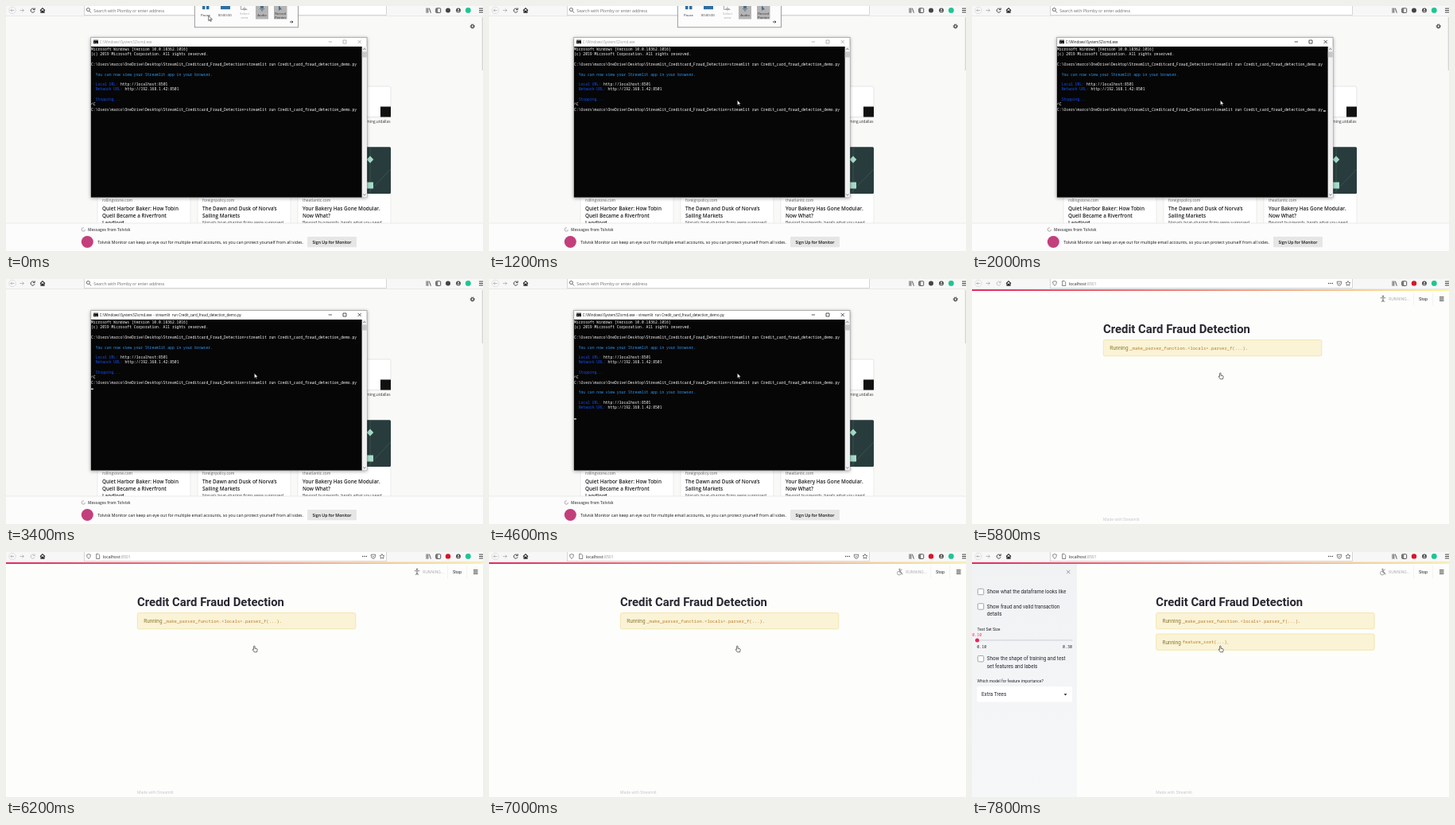
Write an HTML page that moves like this. It is 600 px wide and 308 px high and loops after 8000 ms.

```html
<!DOCTYPE html>
<html lang="en">
<head>
<meta charset="utf-8">
<title>Fraud detection demo</title>
<style>
html, body { margin: 0; width: 100%; height: 100%; overflow: hidden; background: #f9f9f8; }
svg { display: block; width: 100%; height: 100%; }
text { white-space: pre; }
.ui { font-family: "Open Sans", "Noto Sans", sans-serif; }
.app { font-family: Roboto, Inter, sans-serif; }
.mono { font-family: "Noto Sans Mono", "DejaVu Sans Mono", monospace; }
#consoleWin .mono { font-weight: 500; }
.frame { filter: drop-shadow(0 1px 2px rgba(0, 0, 0, .35)); }
</style>
</head>
<body>
<svg id="stage" viewBox="0 0 600 308" preserveAspectRatio="none"></svg>
<script>
const LOOP = 8000, STEP = 200;
const INK = '#262730';

// Drawing helpers; y of a text is its vertical middle.
const esc = s => s.replace(/&/g, '&amp;').replace(/</g, '&lt;');
const text = (x, y, size, s, fill = '#333', cls = 'ui', more = '') =>
  `<text class="${cls}" x="${x}" y="${y + size * 0.35}" font-size="${size}" fill="${fill}" ${more}>${esc(s)}</text>`;
const rect = (x, y, w, h, fill, more = '') =>
  `<rect x="${x}" y="${y}" width="${w}" height="${h}" fill="${fill}" ${more}/>`;
const line = (d, stroke, width = 0.8, more = '') =>
  `<path d="${d}" fill="none" stroke="${stroke}" stroke-width="${width}" ${more}/>`;
const shape = (d, fill, more = '') => `<path d="${d}" fill="${fill}" ${more}/>`;
const disc = (x, y, r, fill, more = '') => `<circle cx="${x}" cy="${y}" r="${r}" fill="${fill}" ${more}/>`;
const group = (id, ...parts) => `<g id="${id}">${parts.join('')}</g>`;
const BOLD = 'font-weight="700"', SEMI = 'font-weight="600"', MID = 'text-anchor="middle"';

// Browser toolbar
const lens = line('M105 6.3l2 2.2', '#444') + disc(103.4, 4.5, 2, 'none', 'stroke="#444" stroke-width=".8"');
const toolbar = group('toolbar',
  rect(0, 0, 600, 12.5, '#f7f7f7'), rect(0, 12, 600, 0.6, '#dededc'),
  rect(98.5, -2, 380, 13.3, '#fff', 'stroke="#c6c6c6" stroke-width=".7"'),
  disc(8, 5.5, 4.2, '#fafafa', 'stroke="#ccc" stroke-width=".6"'),
  line('M10.4 5.5h-4.6m2-2l-2 2 2 2M17.5 5.5h5m-2-2l2 2-2 2', '#aaa'),
  line('M43 5.6l3-2.9 3 2.9M44 5v3.2h1.4v-2h1.2v2H48V5', '#222', 1.1),
  line('M529 2.5v6.2m1.8-6.2v6.2m1.6-6l2 6', '#444', 0.9),
  rect(540.7, 2.8, 6, 5.6, 'none', 'stroke="#444" stroke-width=".9" rx=".8"'), rect(541, 3, 2.2, 5, '#777'),
  disc(569, 5.4, 2.9, '#444'), disc(569, 4.6, 1, '#eee'), rect(567.4, 6.2, 3.2, 1, '#eee', 'rx=".5"'),
  disc(581.3, 5.4, 3.4, '#1fc593'),
  line('M595 3.1h5m-5 2.4h5m-5 2.4h5', '#333', 0.9));
const reload = line('M35.6 4.1A2.5 2.5 0 1 0 36 6.3M36.2 2.4v2.2h-2.2', 'currentColor', 0.9);

const searchBar = group('searchBar', lens,
  text(110.3, 5.7, 5.2, 'Search with Plomby or enter address', '#6c6c6c'),
  disc(556, 5.4, 3, '#444'));
const address = (id, x, icons) => group(id, icons,
  `<text class="ui" x="${x}" y="7.5" font-size="5.2" fill="#222">localhost<tspan fill="#999">:8501</tspan></text>`);
const typedBar = address('typedBar', 110.3, lens);
const siteBar = address('siteBar', 121.8,
  line('M104 2.6l2.3.8c0 2.6-.6 4-2.3 5-1.7-1-2.3-2.4-2.3-5z', '#555', 0.7) +
  line('M113.6 2.5h2.6l1.5 1.5v4.5h-4.1z', '#555', 0.7) +
  [448.6, 451, 453.4].map(x => disc(x, 5.5, 0.75, '#444')).join('') +
  line('M459.3 3.2h5.4v2q-.3 2.7-2.7 3.2-2.4-.5-2.7-3.2zM460.6 5l1.4 1.3 1.4-1.3', '#555', 0.75) +
  line('M473 2.4l.9 2 2.1.2-1.6 1.5.5 2.2-1.9-1.1-1.9 1.1.5-2.2-1.6-1.5 2.1-.2z', '#555', 0.7) +
  disc(556, 5.4, 3.2, '#d5162c'));

// New-tab page behind the console
const cards = [
  [115, 'rollingstone.com', ['Quiet Harbor Baker: How Tobin', 'Quell Became a Riverfront', 'Landlord'], ''],
  [241, 'foreignpolicy.com', ['The Dawn and Dusk of Norva’s', 'Sailing Markets'], 'Norva’s boat-sharing firms were supposed'],
  [367, 'theatlantic.com', ['Your Bakery Has Gone Modular.', 'Now What?'], 'Beyond buzzwords, here’s what you need']
].map(([x, site, title, blurb]) =>
  rect(x, 178, 117, 110, '#fff', 'rx="2" stroke="#e4e4e4" stroke-width=".7"') +
  text(x + 6, 244.7, 4.9, site, '#666') +
  title.map((s, i) => text(x + 6, 254.3 + i * 9.3, 6.4, s, '#1c1c1e', 'ui', SEMI)).join('') +
  text(x + 6, 271.7, 5.2, blurb, '#333')).join('');
const newTab = group('newTab',
  rect(0, 12.6, 600, 296, '#f9f9f8'), rect(598.7, 14, 1.3, 67, '#d5d5d5'),
  disc(586.7, 25.5, 1.7, 'none', 'stroke="#333" stroke-width="1.1"'),
  disc(586.7, 25.5, 2.6, 'none', 'stroke="#333" stroke-width="1" stroke-dasharray="1 1.04"'),
  rect(430, 101, 54, 38.5, '#fff', 'rx="2" stroke="#dcdcdc" stroke-width=".7"'),
  rect(471, 126.5, 13, 13, '#111'),
  text(483.5, 145.5, 4.8, 'elearning.utdallas', '#333', 'ui', 'text-anchor="end"'),
  cards,
  rect(367, 177.2, 117, 58.8, '#293c3d', 'rx="1.5"'),
  line('M458 178v58M484 205l-30 31', '#3f5856', 0.8),
  shape('M458 188.5l4.3 4.5-4.3 4.5-4.3-4.5z', '#a5dcc9'),
  rect(454, 221.5, 8, 8, '#a5dcc9'),
  rect(0, 273, 600, 35, '#fcfcfc'), rect(0, 272.7, 600, 0.6, '#dedede'),
  disc(97.3, 281, 2.2, 'none', 'stroke="#999" stroke-width=".8" stroke-dasharray="10 3"'),
  text(103, 281, 4.8, 'Messages from Tolvisk', '#6a6a6e', 'ui', BOLD),
  disc(102.3, 296.5, 7.5, '#c23f7c'),
  text(115.3, 296.7, 5.24, 'Tolvisk Monitor can keep an eye out for multiple email accounts, so you can protect yourself from all sides.', '#111'),
  rect(379, 290, 62, 13.3, '#e6e6e7', 'rx="1"'),
  text(410, 296.7, 5.2, 'Sign Up for Monitor', '#111', 'ui', SEMI + MID));

// Console window
const CHAR = 2.839, ROW = 6.28;
const con = (row, col, s, fill = '#fafafa') =>
  text(107 + col * CHAR, 54.5 + row * ROW, CHAR / 0.6, s, fill, 'mono');
const BLUE = '#2f98f2', DEEP = '#1550f0';
const urls = row => [
  con(row, 2, 'You can now view your Streamlit app in your browser.', BLUE),
  con(row + 2, 2, 'Local URL:', DEEP), con(row + 2, 13, 'http://localhost:8501'),
  con(row + 3, 2, 'Network URL:', DEEP), con(row + 3, 15, 'http://192.168.1.42:8501')].join('');
const command = 'C:\\Users\\marco\\OneDrive\\Desktop\\Streamlit_Creditcard_Fraud_Detection>streamlit run Credit_card_fraud_detection_demo.py';
const EXE = 'C:\\Windows\\System32\\cmd.exe';
const consoleWin = group('consoleWin',
  rect(106.8, 39.4, 347.2, 201.2, '#fff', 'class="frame" stroke="#858585" stroke-width=".6"'),
  rect(107, 51, 340.8, 189.5, '#060606'),
  rect(447.8, 51, 6, 189.5, '#f0f0f0'), rect(447.8, 57.5, 6, 7, '#c8c8c8'),
  line('M449.2 55l1.6-1.6 1.6 1.6M449.2 236.5l1.6 1.6 1.6-1.6', '#555'),
  rect(110, 42.7, 6, 4.6, '#111'), rect(110, 42.5, 6, 1, '#aaa'), line('M111 45l1 .8-1 .8m2 0h1.6', '#fff', 0.4),
  group('caption', text(117.7, 45.2, 4.5, EXE, 'currentColor'),
    line('M405.7 45h4.3M424 43h4v4h-4zM442.6 42.9l4.2 4.2m0-4.2l-4.2 4.2', 'currentColor', 0.7)),
  group('running', text(184.2, 45.2, 4.48, ' - streamlit  run Credit_card_fraud_detection_demo.py', '#111')),
  con(0, 0, 'Microsoft Windows [Version 10.0.18362.1016]'),
  con(1, 0, '(c) 2019 Microsoft Corporation. All rights reserved.'),
  con(3, 0, command), urls(5),
  con(10, 2, 'Stopping...', DEEP), con(11, 0, '^C'), con(12, 0, command),
  group('output', urls(14)),
  group('caret', rect(0, 0, CHAR, 1.3, '#eee')));

// Screen recorder panel
const label = (x, y, s, fill = '#333') => text(x, y, 4.3, s, fill, 'ui', MID);
const recorder = group('recorder',
  rect(237.3, -3, 130.2, 29.8, '#fcfcfc', 'stroke="#858585" stroke-width=".8"'),
  rect(247, -2, 3.5, 6.2, '#2f6f9f'), rect(252, -2, 3.5, 6.2, '#2f6f9f'), label(251, 11, 'Pause'),
  rect(270, -2, 12, 6.2, '#2f6f9f'), label(275.3, 11, '00:00:00'),
  line('M295.5 0v4.5h8M300 1v5m-2.5-2.5h5', '#aaa', 1), label(300, 9.8, 'Select', '#aaa'), label(300, 14.5, 'area', '#aaa'),
  rect(314, -2, 16, 18.5, '#b4b4b4'), rect(320, -1, 4, 4.5, '#486f88', 'rx="1.5"'), line('M319 3q3 4 6 0M322 5v2', '#486f88'),
  label(322, 11, 'Audio'),
  rect(337, -2, 16.5, 18.5, '#b4b4b4'), shape('M343 -1v7l1.6-1.6h2.4z', '#486f88'),
  label(345.2, 9.8, 'Record'), label(345.2, 14.3, 'Pointer'),
  line('M357 20h4m-1.5-1.3l1.5 1.3-1.5 1.3', '#333', 0.9));

// Streamlit app
const app = (x, y, size, s, fill = INK, more = '') => text(x, y, size, s, fill, 'app', more);
const notice = (y, code) =>
  rect(165.3, y, 274.5, 20.3, '#faf3d6', 'rx="2" stroke="#f3e2a0" stroke-width=".8"') +
  app(173.3, y + 10.4, 6.4, 'Running', '#8c7631') +
  text(198.3, y + 10.4, 5.53, code, '#b87a26', 'mono') +
  app(198.3 + code.length * 3.32, y + 10.4, 6.4, '.', '#8c7631');
const blank = group('blank', rect(0, 12.6, 600, 296, '#f8f8f6'));
const page = group('page', rect(0, 12.6, 600, 296, '#fdfdfc'));
const chrome = group('chrome',
  '<linearGradient id="heat"><stop stop-color="#e52b60"/><stop offset="1" stop-color="#fdf3a0"/></linearGradient>',
  rect(0, 13, 600, 2, 'url(#heat)'),
  app(524.3, 25.5, 5.2, 'RUNNING...', '#b3b3b8'),
  line('M555.5 17v16M579.5 17v16', '#ececec', 0.6),
  app(562, 25, 5.4, 'Stop'),
  line('M588 22.8h5.5m-5.5 2.2h5.5m-5.5 2.2h5.5', '#333', 1));
const poses = [
  disc(517, 21.8, 1.2, '#888') + line('M513.7 23.8h6.6M517 23.5v3M517 26l-1.5 3M517 26l1.5 3', '#888', 1.1),
  disc(518, 21.8, 1.2, '#888') + line('M517.5 23.5l-1.5 2.8 2.5 1-.7 2M516 26l-2.5 2M514.5 24.5l3-.8 2.5 1.5', '#888', 1.1),
  disc(516.5, 21.8, 1.1, '#888') + disc(516, 26.5, 2.4, 'none', 'stroke="#888" stroke-width=".8"') +
    line('M516.6 23.2l.3 2.5h2l1 2.7M517 24l2.5-2', '#888', 1)
].map((p, i) => group('pose' + i, p)).join('');
const main = group('main',
  app(165, 63, 14.86, 'Credit Card Fraud Detection', INK, BOLD),
  notice(76.5, '_make_parser_function.<locals>.parser_f(...)'),
  group('second', notice(103, 'feature_sort(...)')),
  app(165, 302.5, 5.15, 'Made with Streamlit', '#c9c9cc'));

const check = (y, ...rows) =>
  rect(7.3, y - 3.7, 7.4, 7.4, '#fff', 'rx="1" stroke="#8f9096" stroke-width=".8"') +
  rows.map((s, i) => app(18.8, y + i * 9.7, 6.3, s)).join('');
const sidebar = group('sidebar',
  '<linearGradient id="side" x2="0" y2="1"><stop stop-color="#f0f2f4"/><stop offset="1" stop-color="#f6f7f8"/></linearGradient>',
  rect(0, 15, 132, 293, 'url(#side)'),
  line('M119 22.8l4.4 4.4m0-4.4l-4.4 4.4', '#888', 0.8),
  check(50, 'Show what the dataframe looks like'),
  check(68.5, 'Show fraud and valid transaction', 'details'),
  app(6.5, 97, 5.05, 'Test Set Size'),
  text(0.3, 104, 5, '0.10', '#f63366', 'mono'),
  rect(6.5, 110.3, 120, 1.2, '#d3d5db'), disc(6.5, 110.9, 2.5, '#e5265c'),
  text(6.3, 119.3, 5, '0.10', INK, 'mono'), text(114, 119.3, 5, '0.30', INK, 'mono'),
  check(134.2, 'Show the shape of training and test', 'set features and labels'),
  app(6.5, 162.6, 5.05, 'Which model for feature importance?'),
  rect(6.3, 169, 119.7, 19.5, '#fff', 'rx="2"'),
  app(12, 179.2, 6.3, 'Extra Trees'), shape('M115.5 178.2h4l-2 2.3z', '#222'));

const pointers =
  group('arrow', shape('M0 0v6.3l1.5-1.4 1 2.2 1-.4-1-2.2h2z', '#fff', 'stroke="#111" stroke-width=".6"')) +
  group('hand', shape('M311.6 118.5q.8-.9 1.5 0v2.7l2.3.5q.9.3.8 1.3l-.7 2.8h-3.2l-2-2.9q-.2-1 .8-.9l.5.5z',
    '#fff', 'stroke="#333" stroke-width=".7"'));

document.getElementById('stage').innerHTML =
  newTab + blank + page + chrome + poses + main + sidebar + toolbar +
  group('reload', reload) + searchBar + typedBar + siteBar + consoleWin + recorder + pointers;

const $ = id => document.getElementById(id);
const show = (id, on) => $(id).setAttribute('display', on ? 'inline' : 'none');
const move = (id, x, y) => $(id).setAttribute('transform', `translate(${x} ${y})`);

function draw(t) {
  const desk = t < 4800, loaded = t >= 5000, appUp = t >= 5400, body = t >= 5800;
  const active = t >= 1400, started = t >= 2800, wide = t >= 7400;

  ['newTab', 'searchBar', 'consoleWin', 'arrow'].forEach(id => show(id, desk));
  show('recorder', !active);
  $('caption').setAttribute('color', active ? '#111' : '#999');
  show('running', started);
  show('output', t >= 4000);
  show('caret', active && (t + 160) % 1060 < 530);
  const [row, col] = t >= 4000 ? [19, 0] : started ? [13, 0] : [12, 118];
  move('caret', 107 + col * CHAR, 56 + row * ROW);

  const p = Math.min(1, Math.max(0, (t - 200) / 1000)), e = p * p * (3 - 2 * p);
  move('arrow', 254.8 + 57.5 * e, 12.3 + 106.2 * e);

  show('hand', !desk);
  show('blank', !desk && !loaded);
  show('typedBar', !desk && !loaded);
  show('page', loaded);
  show('siteBar', loaded);
  $('reload').setAttribute('color', desk || t >= 6400 ? '#333' : '#bbb');
  show('chrome', appUp);
  const pose = t < 6600 ? 0 : [0, 1, 1, 2][t / STEP % 4];
  [0, 1, 2].forEach(i => show('pose' + i, appUp && i === pose));
  show('main', body);
  move('main', wide ? 66.3 : 0, 0);
  show('second', wide);
  show('sidebar', wide);
}

const start = performance.now();
function tick() {
  const t = (performance.now() - start) % LOOP;
  draw(Math.floor(t / STEP) * STEP);
  requestAnimationFrame(tick);
}
tick();
</script>
</body>
</html>
```
